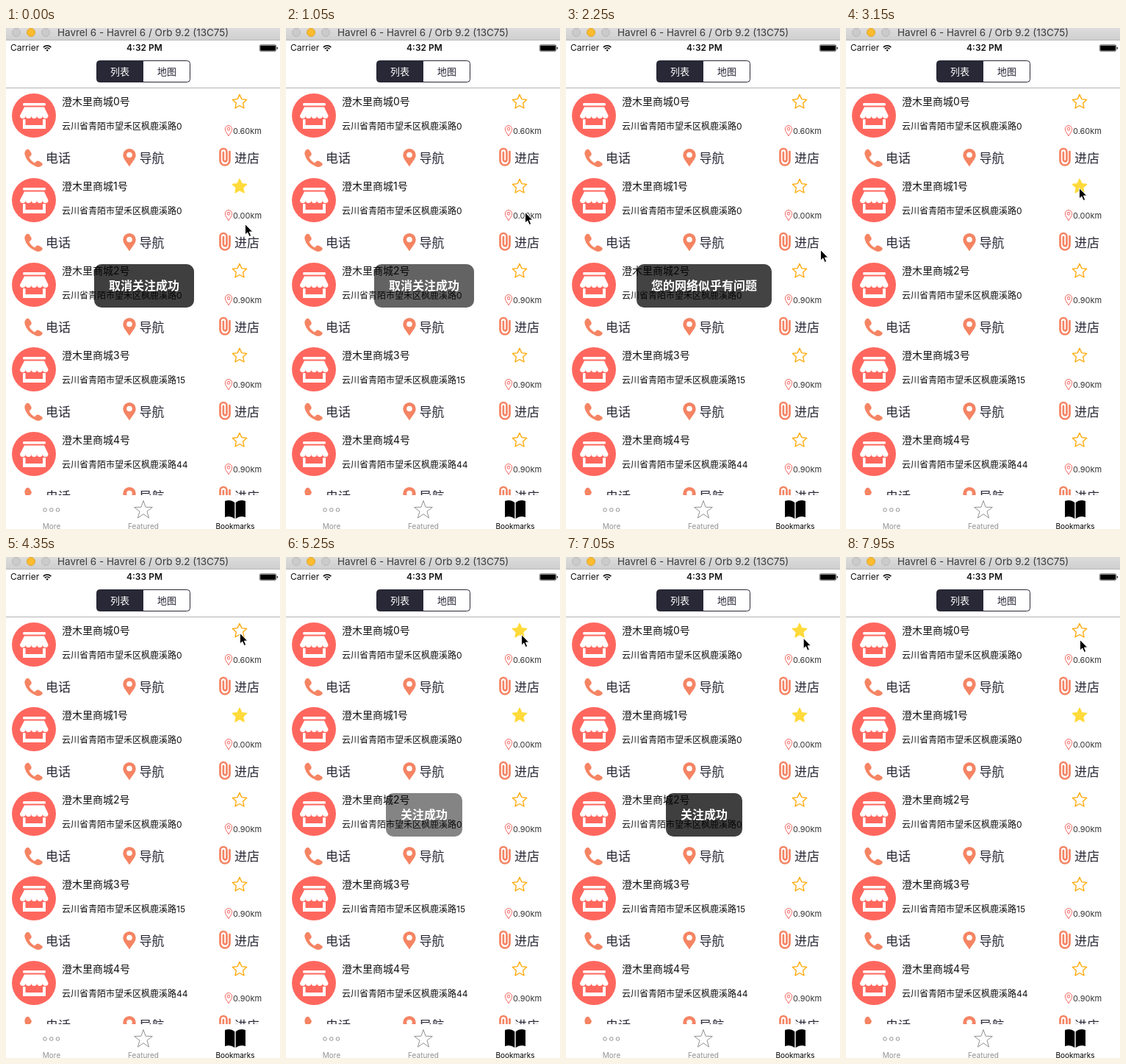
Animation of 373x681 px, one loop 8 s. Source, as an HTML page:

```html
<!DOCTYPE html>
<html lang="zh-CN">
<head>
<meta charset="utf-8">
<title>店铺列表</title>
<style>
  html, body { margin: 0; width: 100%; height: 100%; overflow: hidden; background: #fff; }
  svg { display: block; width: 100%; height: 100%; }
  text { font-family: Inter, "Noto Sans CJK SC", "Noto Sans CJK", sans-serif; fill: #111; }
  .action { font-size: 17px; fill: #282836; }
  .tab { font-size: 10px; text-anchor: middle; fill: #929292; }
</style>
</head>
<body>
<svg viewBox="0 0 373 681" xmlns="http://www.w3.org/2000/svg">
  <defs>
    <linearGradient id="chrome" x2="0" y2="1">
      <stop offset="0" stop-color="#dcdcdc"/><stop offset="1" stop-color="#cfcfcf"/>
    </linearGradient>
    <clipPath id="listClip"><rect y="82" width="373" height="553"/></clipPath>
    <g id="shop">
      <circle cx="38" cy="119" r="30" fill="#ff675e"/>
      <g fill="#fff">
        <rect x="23" y="102" width="31" height="3.500" rx="1.500"/>
        <path d="M25 107.500H52L57.500 119a3.850 4 0 0 1-7.700 0a3.850 4 0 0 1-7.700 0a3.850 4 0 0 1-7.700 0a3.850 4 0 0 1-7.700 0a3.850 4 0 0 1-7.700 0z"/>
        <path d="M23 124h3.500v8h23.500v-8h4v13H23z"/>
      </g>
    </g>
    <g id="actions">
      <g fill="#f58463">
        <path d="M27 166q2.500-2.500 5 0l2.500 4q1 2.500-1 4l-2 1.500q2.500 5.500 7.500 8l2-2q1.800-1.500 4-.5l4 2.500q1.500 1.500.3 3q-3 3.500-8 2Q28 183 25.500 172q-.5-4 1.500-6z"/>
        <path d="M168 188.500C165 183 159.300 178 159.300 172.700a8.700 8.700 0 0 1 17.400 0C176.700 178 171 183 168 188.500z"/>
      </g>
      <circle cx="168" cy="172.500" r="3.800" fill="#fff"/>
      <path d="M304.500 168v12a6.500 6.500 0 0 1-13 0v-11.500a4.500 4.500 0 0 1 9 0v10.500a2.300 2.300 0 0 1-4.600 0v-10" fill="none" stroke="#f58463" stroke-width="2.700" stroke-linecap="round"/>
      <text class="action" x="54" y="183.300">电话</text>
      <text class="action" x="181.500" y="183.300">导航</text>
      <text class="action" x="311" y="183.300">进店</text>
    </g>
    <g id="pin" fill="none" stroke="#f3635c">
      <path d="M303 146.800C301 143 298.300 140.500 298.300 137.300a4.700 4.700 0 0 1 9.400 0C307.700 140.500 305 143 303 146.800z"/>
      <circle cx="303" cy="137.300" r="1.900"/>
    </g>
  </defs>

  <rect width="373" height="681" fill="#fff"/>

  <rect width="373" height="16" fill="url(#chrome)"/>
  <rect y="16" width="373" height="1" fill="#b9b9b9"/>
  <g fill="#cbcbcb" stroke="#b8b8b8">
    <circle cx="14" cy="6" r="5.500"/>
    <circle cx="34" cy="6" r="5.500" fill="#fdbc2f" stroke="#e0a32a"/>
    <circle cx="54" cy="6" r="5.500"/>
  </g>
  <text x="70" y="11" font-size="13.500" style="fill:#3a3a3a">Havrel 6 - Havrel 6 / Orb 9.2 (13C75)</text>

  <text x="6" y="31.300" font-size="12">Carrier</text>
  <g fill="none" stroke="#000" stroke-width="1.600">
    <path d="M50.800 26.200a7.500 7.500 0 0 1 10.600 0M52.800 28.400a4.700 4.700 0 0 1 6.600 0"/>
    <path d="M56.100 31.800l-1.700-1.700a2.400 2.400 0 0 1 3.400 0z" fill="#000" stroke="none"/>
  </g>
  <text id="clock" x="188.500" y="31.300" font-size="12" font-weight="600" text-anchor="middle"></text>
  <rect x="345.300" y="22.800" width="22.500" height="8.800" rx="2" fill="none" stroke="#000" stroke-width=".6"/>
  <rect x="346.200" y="23.700" width="20.700" height="7" rx="1" fill="#000"/>
  <path d="M368.700 25.700q1.300.3 1.300 1.600t-1.300 1.600z" fill="#000"/>

  <path d="M187 44.500h-59.500a4 4 0 0 0-4 4v21a4 4 0 0 0 4 4h59.500z" fill="#282836"/>
  <rect x="123.500" y="44.500" width="127" height="29" rx="4" fill="none" stroke="#282836"/>
  <text x="142" y="63.700" font-size="13" style="fill:#fff">列表</text>
  <text x="206" y="63.700" font-size="13" style="fill:#282836">地图</text>
  <rect y="81" width="373" height="1" fill="#b2b2b2"/>

  <g id="list" clip-path="url(#listClip)"></g>

  <g fill="none" stroke="#929292">
    <circle cx="53" cy="655" r="2.300"/><circle cx="61.800" cy="655" r="2.300"/><circle cx="70.500" cy="655" r="2.300"/>
    <path id="tabStar"/>
  </g>
  <path d="M311.300 645q-5.500-5-13.300-2v22q7.500-2.500 13.300 2zM312.700 645q5.500-5 13.300-2v22q-7.500-2.500-13.300 2z" fill="#000"/>
  <text class="tab" x="62" y="680.500">More</text>
  <text class="tab" x="187" y="680.500">Featured</text>
  <text class="tab" x="312" y="680.500" style="fill:#000">Bookmarks</text>

  <g id="toast">
    <rect id="toastBox" y="321" height="59" rx="10" fill-opacity=".8"/>
    <text id="toastText" x="188" y="356.300" font-size="16" font-weight="600" text-anchor="middle" style="fill:#fff"></text>
  </g>
  <path id="cursor" d="M.5.5V15L3.800 12L6.200 17.500L8.700 16.400L6.400 11.100H10.800Z" fill="#000" stroke="#fff"/>
</svg>

<script>
const LOOP = 8000, STEP = 150, ROW = 115;
const $ = id => document.getElementById(id);

function starPath(cx, cy, r, inner) {
  const points = Array.from({ length: 10 }, (_, i) => {
    const a = i * Math.PI / 5 - Math.PI / 2, d = i % 2 ? r * inner : r;
    return (cx + d * Math.cos(a)).toFixed(2) + ' ' + (cy + d * Math.sin(a)).toFixed(2);
  });
  return 'M' + points.join('L') + 'Z';
}

const shops = [['0', '0.60'], ['0', '0.00'], ['0', '0.90'], ['15', '0.90'], ['44', '0.90']];
$('list').innerHTML = shops.map(([door, km], i) => `
  <g transform="translate(0 ${i * ROW})">
    <use href="#shop"/>
    <text x="76" y="104.800" font-size="14">澄木里商城${i}号</text>
    <text x="76" y="138" font-size="12">云川省青陌市望禾区枫鹿溪路${door}</text>
    <path id="star${i}" d="${starPath(318, 100.6, 10.2, 0.48)}" stroke-width="1.400" stroke-linejoin="round"/>
    <use href="#pin"/>
    <text x="309" y="144" font-size="11" style="fill:#333">${km}km</text>
    <use href="#actions"/>
  </g>`).join('');
$('tabStar').setAttribute('d', starPath(187, 655.5, 13, 0.4));

const ADDED = '关注成功', REMOVED = '取消关注成功', OFFLINE = '您的网络似乎有问题';
const toasts = [
  [-300, REMOVED], [900, REMOVED], [2040, OFFLINE], [3150, ADDED],
  [4650, ADDED], [5700, REMOVED], [6750, ADDED], [7950, REMOVED]
];
// [age, opacity]
const fade = [[0, 0], [150, .76], [210, .92], [300, .94], [450, .9], [600, .6], [750, .25], [900, 0]];
// [time, x, y] of the pointer tip
const path = [
  [0, 325, 266], [150, 325, 258], [600, 322, 220], [900, 322, 220], [1050, 325, 250],
  [1800, 325, 270], [1950, 325, 270], [2100, 338, 292], [2250, 346, 301], [2400, 349, 300],
  [2700, 331, 246], [3000, 317, 217], [3300, 317, 217], [3600, 324, 190], [4050, 324, 134],
  [4200, 322, 118], [4350, 318, 103], [4650, 318, 103], [5100, 321, 106], [5550, 318, 103],
  [6750, 318, 103], [7200, 325, 113], [7650, 324, 110], [7950, 318, 112]
];

function sample(keys, t, k = 1) {
  const n = keys.findIndex(key => key[0] > t);
  if (n < 0) return keys[keys.length - 1][k];
  if (n === 0) return keys[0][k];
  const a = keys[n - 1], b = keys[n];
  return a[k] + (b[k] - a[k]) * (t - a[0]) / (b[0] - a[0]);
}

function setStar(i, on) {
  $('star' + i).setAttribute('fill', on ? '#ffda3a' : 'none');
  $('star' + i).setAttribute('stroke', on ? '#ffda3a' : '#ffad10');
}

function draw(time) {
  // the screen refreshes in coarse steps
  const t = Math.floor(time / STEP) * STEP;
  $('clock').textContent = t < 4200 ? '4:32 PM' : '4:33 PM';
  setStar(0, (t >= 4650 && t < 5700) || (t >= 6750 && t < 7950));
  setStar(1, t < 900 || t >= 3150);

  const [start, message] = toasts.filter(toast => toast[0] <= t).pop();
  const width = message.length * 16 + 40;
  $('toastText').textContent = message;
  $('toastBox').setAttribute('x', 188 - width / 2);
  $('toastBox').setAttribute('width', width);
  $('toast').setAttribute('opacity', sample(fade, t - start));

  $('cursor').setAttribute('transform', `translate(${sample(path, t, 1)} ${sample(path, t, 2)})`);
}

shops.forEach((_, i) => setStar(i, false));
const begin = performance.now();
function tick() {
  draw((performance.now() - begin) % LOOP);
  requestAnimationFrame(tick);
}
tick();
</script>
</body>
</html>
```
